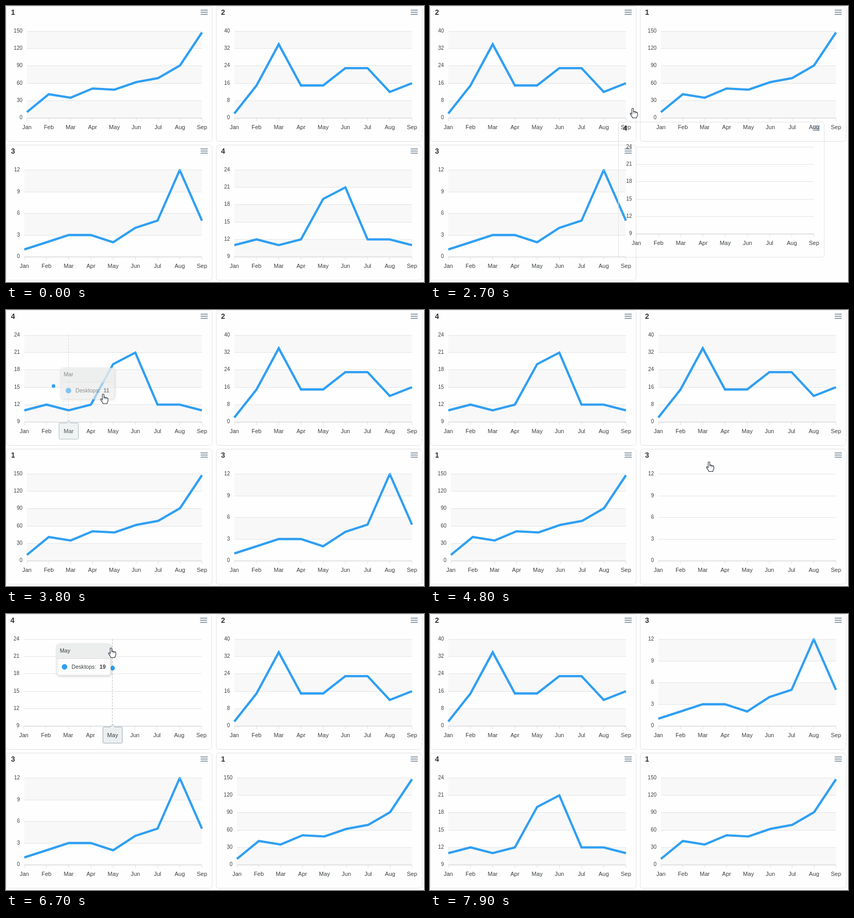
Recreate the animation shown at these times as an HTML page with a canvas. Size 800 px wide and 529 px high, loop 8 s.

```html
<!DOCTYPE html>
<html lang="en">
<head>
<meta charset="utf-8">
<title>Sortable charts</title>
<style>
html, body { margin: 0; width: 100%; height: 100%; overflow: hidden; background: #fefefe; }
canvas { display: block; }
</style>
</head>
<body>
<canvas id="stage" width="800" height="529"></canvas>
<script>
const ctx = document.getElementById('stage').getContext('2d');
const LOOP = 8000, STEP = 100;
const BLUE = '#2f9ff3', INK = '#3b4042', GRID = '#e4e4e4';
const FONT = '"Liberation Sans", Arial, sans-serif';
const MONTHS = ['Jan', 'Feb', 'Mar', 'Apr', 'May', 'Jun', 'Jul', 'Aug', 'Sep'];
const TOP = 48.5, BOTTOM = 214.5, RIGHT = 375;

const IDS = [1, 2, 3, 4];
const charts = {
  1: { left: 40, min: 0, max: 150, rows: 5, data: [10, 41, 35, 51, 49, 62, 69, 91, 148] },
  2: { left: 35, min: 0, max: 40, rows: 5, data: [2, 15, 34, 15, 15, 23, 23, 12, 16] },
  3: { left: 35, min: 0, max: 12, rows: 4, data: [1, 2, 3, 3, 2, 4, 5, 12, 5] },
  4: { left: 35, min: 9, max: 24, rows: 5, data: [11, 12, 11, 12, 19, 21, 12, 12, 11] }
};
const slots = IDS.map((_, i) => [i % 2 * 402, (i >> 1) * 266]);

// Each drag takes a chart to a slot along a bowed path; the others make room halfway
const moves = [
  { id: 1, to: 1, start: 1200, end: 1640, bow: [0, 16], grab: [116, 28] },
  { id: 4, to: 0, start: 2600, end: 3100, bow: [0, -28], grab: [83, 18] },
  { id: 3, to: 2, start: 4800, end: 5772, bow: [0, 5], grab: [136, 24] },
  { id: 4, to: 2, start: 6685, end: 7400, bow: [-15, 0], grab: [206, 57] }
];
const LEAD = 60; // how far the pointer runs ahead of the dragged panel

const hovers = [
  { id: 1, month: 3, start: 1900, end: 2300 },
  { id: 4, month: 2, start: 3700, end: 3900 },
  { id: 4, month: 6, start: 3900, end: 4200 },
  { id: 4, month: 4, start: 6200, end: 6800 },
  { id: 4, month: 4, start: 7400, end: 7700 }
];

const clamp = v => Math.max(0, Math.min(1, v));
const smooth = p => p * p * (3 - 2 * p);
const mix = (a, b, p) => a.map((v, i) => v + (b[i] - v) * p);
const add = (a, b, k = 1) => a.map((v, i) => v + b[i] * k);

function place(id, t) {
  let order = IDS, pos = slots[id - 1];
  for (const m of moves) {
    order = order.filter(n => n !== m.id);
    order.splice(m.to, 0, m.id);
    const goal = slots[order.indexOf(id)];
    if (id === m.id) {
      const p = clamp((t - m.start) / (m.end - m.start));
      pos = add(mix(pos, goal, smooth(p)), m.bow, Math.sin(Math.PI * p));
    } else {
      const p = clamp((t - (m.start + m.end) / 2) / 300);
      pos = mix(pos, goal, 1 - (1 - p) ** 2.8);
    }
  }
  return pos;
}

// The pointer holds the dragged panel, and glides from stop to stop in between
const held = (m, t) => add(place(m.id, t + LEAD), m.grab);
const stops = [
  { t: 400, pos: [149, -22] }, { t: 1000, pos: [150, 29] },
  { t: 3800, pos: [186, 161] }, { t: 7900, pos: [232, -30] },
  ...moves.flatMap(m => [m.start - LEAD, m.end - LEAD].map(t => ({ t, pos: held(m, t) })))
].sort((a, b) => a.t - b.t);

function pointerAt(t) {
  const m = moves.find(m => t >= m.start - LEAD && t < m.end - LEAD);
  if (m) return held(m, t);
  const a = stops.findLast(s => s.t <= t) || stops[0];
  const b = stops.find(s => s.t > t) || a;
  return mix(a.pos, b.pos, a === b ? 0 : smooth(clamp((t - a.t) / (b.t - a.t))));
}

function text(str, x, y, size, align = 'left', color = INK, weight = '') {
  ctx.font = `${weight} ${size}px ${FONT}`;
  ctx.textAlign = align;
  ctx.fillStyle = color;
  ctx.fillText(str, x, y);
}

function stroke(points, color, width) {
  ctx.beginPath();
  points.forEach(p => ctx.lineTo(...p));
  ctx.strokeStyle = color;
  ctx.lineWidth = width;
  ctx.stroke();
}

function box(x, y, w, h, r, fill, line) {
  ctx.beginPath();
  ctx.roundRect(x, y, w, h, r);
  if (fill) { ctx.fillStyle = fill; ctx.fill(); }
  if (line) { ctx.strokeStyle = line; ctx.lineWidth = 1; ctx.stroke(); }
}

function dot(x, y, r, color = BLUE) {
  ctx.beginPath();
  ctx.arc(x, y, r, 0, 7);
  ctx.fillStyle = color;
  ctx.fill();
}

const pointAt = (c, i) => [
  c.left + (RIGHT - c.left) * i / 8,
  BOTTOM - (c.data[i] - c.min) / (c.max - c.min) * (BOTTOM - TOP)
];

function drawPanel(id, bare) {
  const c = charts[id], row = (BOTTOM - TOP) / c.rows, width = RIGHT - c.left;
  box(0.5, 0.5, 394, 259, 5, null, '#e3e3e3');
  text(id, 9.5, 16.5, 14, 'left', '#2f3436', 'bold');
  for (const y of [8, 12, 16]) stroke([[372.5, y], [386, y]], '#6e8192', 1.5);

  if (!bare) {
    ctx.fillStyle = '#f8f8f8';
    for (let i = 0; i < c.rows; i += 2) ctx.fillRect(c.left, TOP + i * row, width, row);
  }
  for (let i = 0; i <= c.rows; i++) {
    const y = Math.round(TOP - 0.5 + i * row) + 0.5;
    stroke([[c.left, y], [RIGHT, y]], GRID, 1);
    text(c.max - (c.max - c.min) * i / c.rows, c.left - 8.5, y + 2.3, 10, 'right');
  }
  stroke([[c.left, 215], [RIGHT, 215]], '#dedede', 1.3);
  MONTHS.forEach((m, i) => {
    const x = pointAt(c, i)[0];
    stroke([[x, 215], [x, 220.5]], '#dedede', 1);
    text(m, x, 236, 11, 'center');
  });

  if (!bare) {
    ctx.save();
    ctx.beginPath();
    ctx.rect(c.left - 3, TOP - 2, width + 6, BOTTOM - TOP + 4);
    ctx.clip();
    stroke(c.data.map((_, i) => pointAt(c, i)), BLUE, 4.3);
    ctx.restore();
    const peak = c.data.indexOf(c.max);
    if (peak >= 0) dot(pointAt(c, peak)[0], TOP + 0.5, 1, '#b5dbfa');
  }
}

const tipSpot = ([x, y], i) => [x + (i < 4 ? 18 : -107), y - 46];

function drawHover(id, t) {
  const n = hovers.findIndex(h => h.id === id && t >= h.start && t < h.end);
  if (n < 0) return;
  const { start, month } = hovers[n], c = charts[id], prev = hovers[n - 1];
  const linked = prev && prev.end === start;
  const p = clamp((t - start) / 132), fade = linked ? 1 : p * p;
  const from = linked ? pointAt(c, prev.month) : [0, 0];
  const target = pointAt(c, month), x = target[0];

  ctx.save();
  ctx.globalAlpha = fade;
  ctx.setLineDash([3, 3]);
  stroke([[x - 0.5, TOP], [x - 0.5, BOTTOM]], '#b6b6b6', 1);
  ctx.setLineDash([]);

  ctx.globalAlpha = linked ? 1 : p;
  box(x - 18.5, 216.5, 37, 31, 2, '#eceff0', '#9aabb4');
  ctx.beginPath();
  for (const dx of [-5, 0, 5]) ctx.lineTo(x + dx, dx ? 217 : 211.5);
  ctx.fillStyle = '#eceff0';
  ctx.fill();
  ctx.stroke();
  text(MONTHS[month], x, 235.5, 11, 'center');

  ctx.globalAlpha = 1;
  dot(...mix(from, target, p), linked ? 4.5 : 4.5 * p);

  ctx.globalAlpha = fade;
  ctx.translate(...mix(linked ? tipSpot(from, prev.month) : from, tipSpot(target, month), p));
  ctx.shadowColor = 'rgba(0,0,0,.18)';
  ctx.shadowBlur = 4;
  ctx.shadowOffsetX = ctx.shadowOffsetY = 1;
  box(0, 0, 103, 60, 5, '#fdfdfd', '#e3e3e3');
  ctx.shadowColor = 'transparent';
  box(0.5, 0.5, 102, 27, [5, 5, 0, 0], '#eceeee');
  stroke([[0.5, 27.5], [102.5, 27.5]], '#dddddd', 1);
  text(MONTHS[month], 6, 16.5, 10.6);
  dot(15, 43.5, 5.3);
  text('Desktops:', 28.5, 47, 10.6);
  text(c.data[month], 82, 47, 10.6, 'left', INK, 'bold');
  ctx.restore();
}

const hand = new Path2D('M-1.6 11V1.4C-1.6-.4 1.5-.4 1.5 1.4V7C2 5.6 4.4 5.8 4.4 7.6C4.8 6.2 7 6.4 7 8.2' +
  'C7.6 7.2 9.2 7.6 9.2 9.4V13C9.2 15 7.4 15.8 7.4 18.5H-.4C-.6 16-3.6 13.6-4.8 10.8C-5.4 9-3.2 8.4-1.6 11Z');

function drawHand() {
  ctx.fillStyle = '#fff';
  ctx.fill(hand);
  ctx.strokeStyle = '#222b38';
  ctx.lineWidth = 1.1;
  ctx.stroke(hand);
}

function at(pos, draw) {
  ctx.save();
  ctx.translate(...pos.map(Math.round));
  draw();
  ctx.restore();
}

function render(t) {
  ctx.fillStyle = '#fefefe';
  ctx.fillRect(0, 0, 800, 529);
  const drag = moves.find(m => t >= m.start && t < m.end);
  const bare = id => drag !== undefined && drag.id === id;
  const stack = [...IDS].sort((a, b) => bare(a) - bare(b));
  for (const id of stack) at(place(id, t), () => drawPanel(id, bare(id)));
  for (const id of stack) at(place(id, t), () => drawHover(id, t));
  at(pointerAt(t), drawHand);
}

const began = performance.now();
function frame() {
  const t = (performance.now() - began) % LOOP;
  render(Math.floor(t / STEP) * STEP);
  requestAnimationFrame(frame);
}
frame();
</script>
</body>
</html>
```
